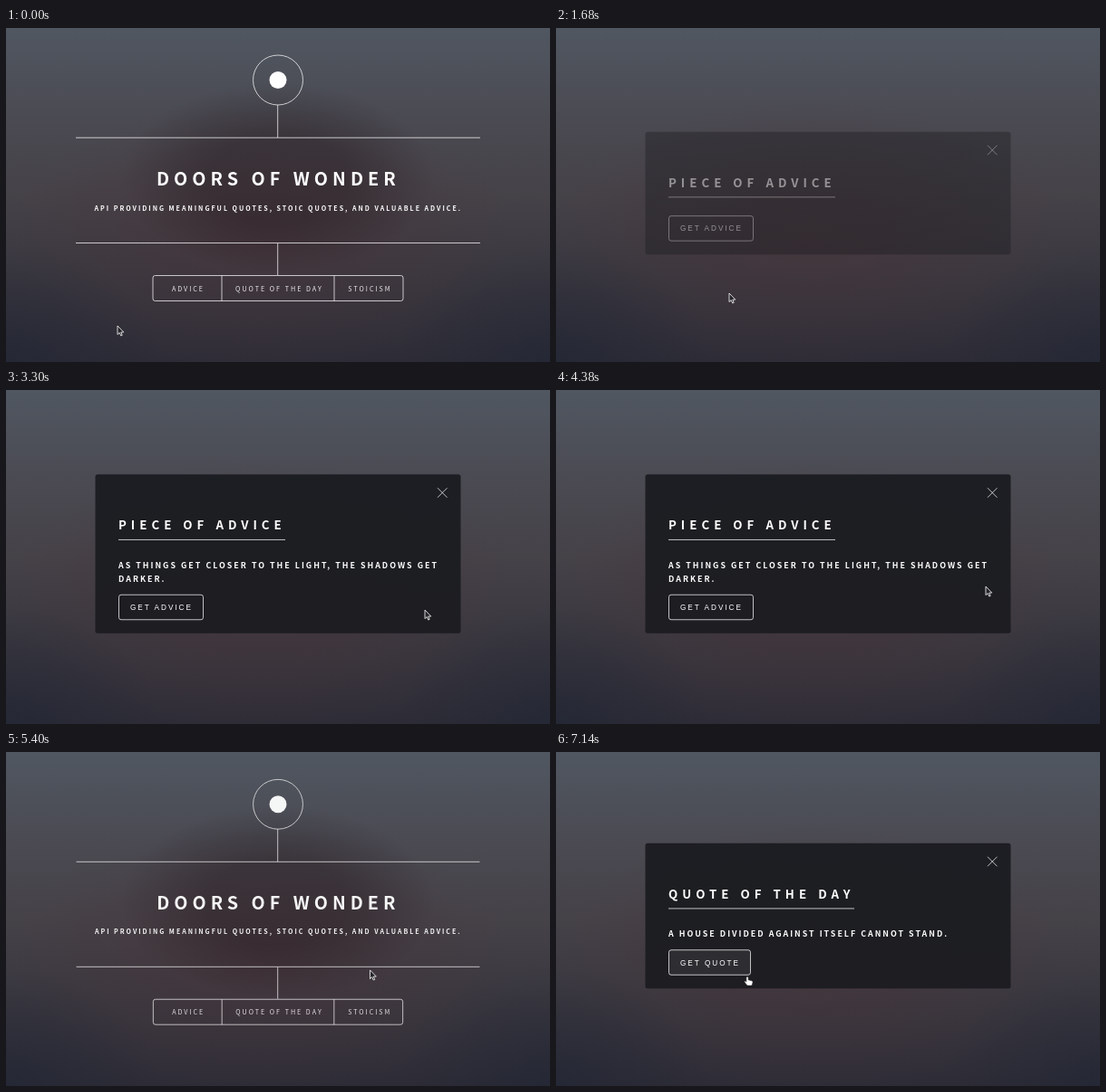
Animation of 600x369 px, one loop 7200 ms. Source, as an HTML page:

```html
<!DOCTYPE html>
<html lang="en">
<head>
<meta charset="utf-8">
<title>Doors of Wonder</title>
<style>
  html, body { margin: 0; width: 100%; height: 100%; overflow: hidden; background: #3b373f; }
  svg { display: block; width: 100%; height: 100%; }
  text { font-family: "Noto Sans CJK JP", "Noto Sans CJK SC", "Noto Sans CJK", "Open Sans", sans-serif; fill: #fff; }
  #header { transform-origin: 300px 166px; }
  .lines { fill: none; stroke: #fff; stroke-opacity: .72; }
  .mid { text-anchor: middle; }
  .title { font-size: 19.8px; font-weight: 600; letter-spacing: 5px; }
  .sub { font-size: 7.07px; font-weight: 700; letter-spacing: 2px; }
  .nav { font-size: 7.16px; font-weight: 300; letter-spacing: 2px; opacity: .9; }
  .head { font-size: 13.3px; font-weight: 600; letter-spacing: 5px; }
  .body { font-size: 8.9px; font-weight: 700; letter-spacing: 2px; }
  .button { font: 8.2px "Liberation Sans", Arial, sans-serif; letter-spacing: 2px; }
</style>
</head>
<body>
<svg viewBox="0 0 600 369" preserveAspectRatio="none">
  <defs>
    <linearGradient id="sky" x2="0" y2="1">
      <stop stop-color="#505761"/>
      <stop offset=".25" stop-color="#4b4b53"/>
      <stop offset=".5" stop-color="#454248"/>
      <stop offset=".8" stop-color="#37353d"/>
      <stop offset="1" stop-color="#2d2c36"/>
    </linearGradient>
    <radialGradient id="glow">
      <stop stop-color="#4a3439" stop-opacity=".55"/>
      <stop offset="1" stop-color="#4a3439" stop-opacity="0"/>
    </radialGradient>
    <radialGradient id="corner">
      <stop stop-color="#1c2334" stop-opacity=".5"/>
      <stop offset="1" stop-color="#1c2334" stop-opacity="0"/>
    </radialGradient>
    <radialGradient id="shade">
      <stop offset=".45" stop-color="#140a0d" stop-opacity=".28"/>
      <stop offset="1" stop-color="#140a0d" stop-opacity="0"/>
    </radialGradient>
  </defs>

  <rect width="600" height="369" fill="url(#sky)"/>
  <ellipse cx="280" cy="230" rx="280" ry="150" fill="url(#glow)"/>
  <ellipse cy="369" rx="170" ry="130" fill="url(#corner)"/>
  <ellipse cx="600" cy="369" rx="170" ry="130" fill="url(#corner)"/>

  <g id="header">
    <ellipse cx="300" cy="166" rx="173" ry="106" fill="url(#shade)"/>
    <g class="lines">
      <circle cx="300" cy="57.5" r="27.5"/>
      <path d="M299.7 85V121M77 121.2H523M77 237.5H523M299.7 238V273M238 273.5V301.5M362 273.5V301.5"/>
      <rect x="162" y="273.5" width="276" height="28" rx="2.5"/>
    </g>
    <circle cx="300" cy="57.5" r="9.5" fill="#fff"/>
    <text class="title mid" x="300.3" y="174">DOORS OF WONDER</text>
    <text class="sub mid" x="300.3" y="201.5">API PROVIDING MEANINGFUL QUOTES, STOIC QUOTES, AND VALUABLE ADVICE.</text>
    <text class="nav mid" x="201" y="290.6">ADVICE</text>
    <text class="nav mid" x="301.5" y="290.6">QUOTE OF THE DAY</text>
    <text class="nav mid" x="401.5" y="290.6">STOICISM</text>
  </g>
  <g id="panel"></g>
  <path id="cursor"/>
</svg>

<script>
const LOOP = 7200, STEP = 60, FADE = 220;
const header = document.getElementById('header');
const panel = document.getElementById('panel');
const cursor = document.getElementById('cursor');

const ARROW = 'M0 0V9.6L2.2 7.6L3.7 11L5.2 10.4L3.8 7.1H6.8Z';
const HAND = 'M-1.1 1Q0 -.8 1.1 1V3.8L5 4.8Q6.2 5.3 6 6.6L5 10H0L-3 6.2Q-3.4 4.8 -2.2 4.9L-1.1 5.8Z';

const advice = {
  title: 'PIECE OF ADVICE', rule: 184, label: 'GET ADVICE', width: 94, reveal: 2280,
  height: 175.5, lines: ['AS THINGS GET CLOSER TO THE LIGHT, THE SHADOWS GET', 'DARKER.']
};
const quote = {
  title: 'QUOTE OF THE DAY', rule: 205, label: 'GET QUOTE', width: 91, reveal: 7020,
  height: 160.5, lines: ['A HOUSE DIVIDED AGAINST ITSELF CANNOT STAND.']
};

// pointer moves: start, end, x, y; it rests in between
const home = { x: 123, y: 329 };
const moves = [
  [600, 1020, 192, 287], [1320, 1500, 191, 293], [1740, 2100, 198, 228],
  [2640, 3300, 462, 243], [3900, 4140, 480, 124], [4140, 4380, 474, 217],
  [4380, 4680, 490, 296], [4680, 5460, 400, 240], [5460, 5760, 326, 279],
  [6120, 6780, 206, 224], [6900, 7140, 211, 248]
];

function ease(t, start, length = FADE) {
  const p = Math.min(1, Math.max(0, (t - start) / length));
  return p * p * (3 - 2 * p);
}

function pointer(t) {
  return moves.reduce((from, [start, end, x, y]) => {
    const p = ease(t, start, end - start);
    return { x: from.x + (x - from.x) * p, y: from.y + (y - from.y) * p };
  }, home);
}

const inside = (p, x, y, w, h) => p.x >= x && p.x <= x + w && p.y >= y && p.y <= y + h;

function panelMarkup(item, h, lines, hover) {
  const top = 181 - h / 2, button = top + h - 42.5;
  return `
    <rect x="98.5" y="${top}" width="403" height="${h}" rx="2.5" fill="#1b1c20" fill-opacity=".94"/>
    <path class="lines" d="M476 ${top + 15}l10.5 10.5m0 -10.5l-10.5 10.5M124 ${top + 72.2}h${item.rule}"/>
    <text class="head" x="124" y="${top + 61}">${item.title}</text>
    ${lines.map((s, i) => `<text class="body" x="124" y="${top + 103.7 + 15 * i}">${s}</text>`).join('')}
    <rect class="lines" x="124.5" y="${button}" width="${item.width - 1}" height="27.5" rx="2.5"
      style="fill:#fff;fill-opacity:${hover ? .075 : 0}"/>
    <text class="button" x="137" y="${button + 16.8}">${item.label}</text>`;
}

function draw(t) {
  const tip = pointer(t);

  const hidden = ease(t, 1360) - ease(t, 5210) + ease(t, 5800);
  header.style.opacity = 1 - hidden;
  header.style.transform = `scale(${1 - .05 * hidden})`;
  header.style.filter = hidden > 0 ? `blur(${hidden}px)` : 'none';

  const shown = ease(t, 1580) - ease(t, 4980) + ease(t, 6020);
  const item = t < 5500 ? advice : quote;
  const open = t >= item.reveal;
  const height = open ? item.height : 135.5;
  const overButton = shown === 1 && inside(tip, 124, 138.5 + height / 2, item.width, 31);
  const overNav = hidden === 0 && inside(tip, 162, 273, 276, 29);
  panel.style.opacity = shown;
  panel.setAttribute('transform', `translate(0 ${2.5 * (1 - shown)})`);
  panel.innerHTML = shown > 0 ? panelMarkup(item, height, open ? item.lines : [], overButton) : '';

  const hand = overButton || overNav;
  cursor.setAttribute('d', hand ? HAND : ARROW);
  cursor.setAttribute('transform', `translate(${tip.x} ${tip.y})`);
  cursor.setAttribute('fill', hand ? '#fff' : '#26242a');
  cursor.setAttribute('stroke', hand ? '#222' : '#fff');
  cursor.setAttribute('stroke-width', hand ? .5 : .8);
}

const begin = performance.now();
function tick() {
  const t = (performance.now() - begin) % LOOP;
  draw(Math.floor(t / STEP) * STEP);
  requestAnimationFrame(tick);
}
tick();
</script>
</body>
</html>
```
